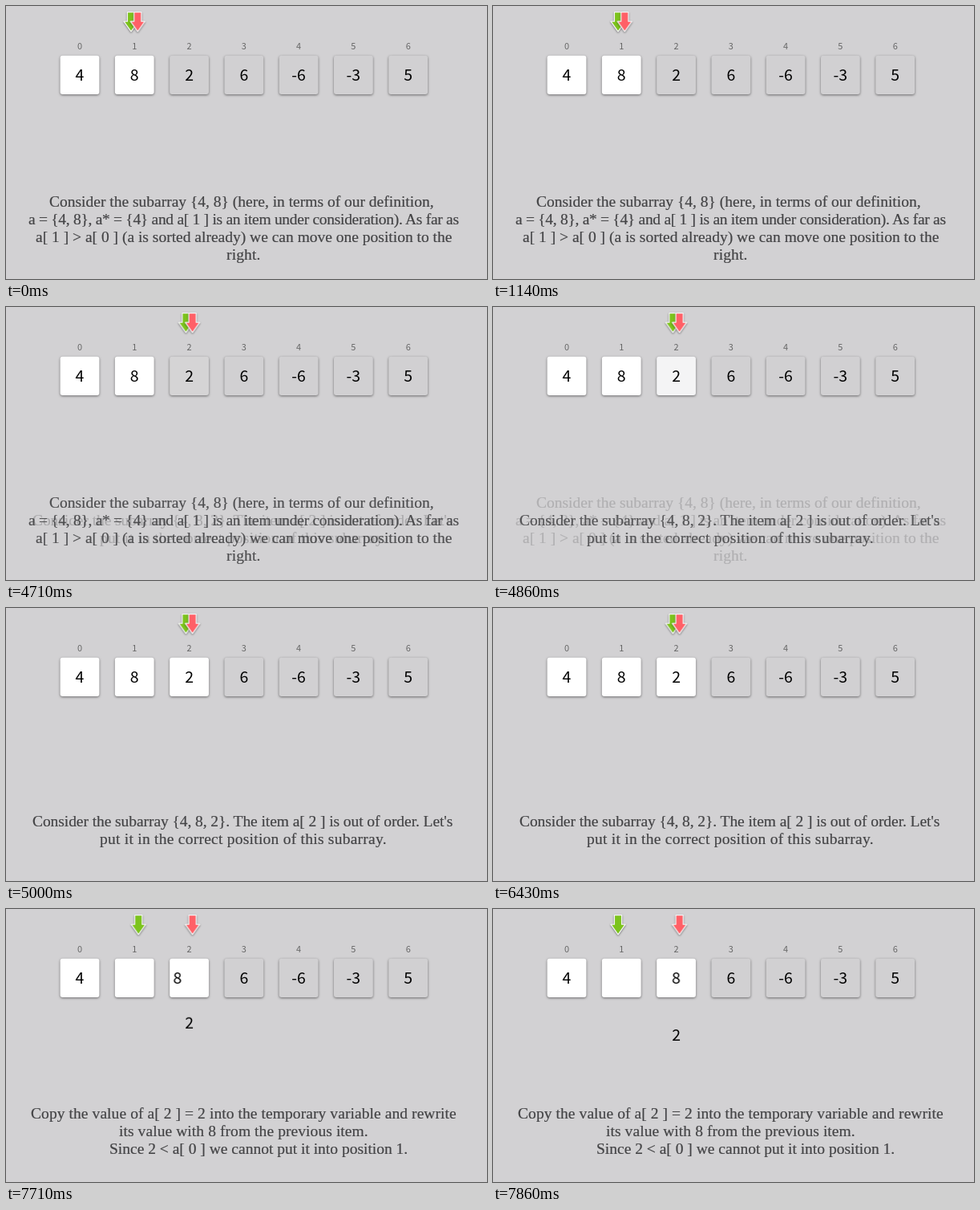
An HTML page that plays this animation: 600x340 px, repeating every 8 s.

```html
<!DOCTYPE html>
<html lang="en">
<head>
<meta charset="utf-8">
<title>Insertion sort</title>
<style>
  html, body { margin: 0; width: 100%; height: 100%; overflow: hidden; background: #d2d1d3; }
  svg { display: block; width: 600px; height: 340px; }

  .box { fill: #d1d0d2; filter: drop-shadow(0 1.5px 1.5px rgba(0, 0, 0, .5)); }
  .sorted { fill: #fff; }
  .num, .index { font-family: "Noto Sans CJK JP", "Noto Sans CJK SC", "Noto Sans CJK", "Noto Sans", sans-serif; text-anchor: middle; }
  .num { font-size: 19.5px; fill: #000; }
  .index { font-size: 11px; fill: #666; }
  .note { font: 19.5px "Liberation Serif", serif; fill: #434345; stroke: #434345; stroke-width: .2px; }
  .arrow { stroke: #f4f4f4; stroke-width: 1.3; stroke-linejoin: round; filter: drop-shadow(0 1.5px 1px rgba(0, 0, 0, .45)); }
  #green { fill: #7cc31c; }
  #red { fill: #ff6067; }

  .anim { animation: 8s cubic-bezier(.37, 0, .63, 1) infinite both; }
  #red { animation-name: red; }
  #green { animation-name: green; }
  #n1 { animation-name: shift; }
  #n2 { animation-name: lift; }
  #b2 { animation-name: whiten; animation-timing-function: cubic-bezier(.333, 0, .667, .333); }
  #note0 { animation-name: note0; }
  #note1 { animation-name: note1; }
  #note2 { animation-name: note2; }

  @keyframes red {
    0%, 53.5% { transform: translateX(164.3px); }
    56.875%, 100% { transform: translateX(232.6px); }
  }
  @keyframes green {
    0%, 54.75% { transform: translateX(156px); }
    58.25%, 92.875% { transform: translateX(224.4px); }
    97.5%, 100% { transform: translateX(156px); }
  }
  @keyframes shift {
    0%, 93.1875% { transform: none; }
    97.8125%, 100% { transform: translateX(68.3px); }
  }
  @keyframes lift {
    0%, 93.1875% { transform: none; }
    97.8125%, 100% { transform: translateY(71px); }
  }
  @keyframes whiten {
    0%, 58.025% { fill: #d1d0d2; }
    61.15%, 100% { fill: #fff; }
  }
  /* notes fade in linearly and fade out along 1 - p² */
  @keyframes note0 {
    0%, 58.025% { opacity: 1; animation-timing-function: cubic-bezier(.333, 0, .667, .333); }
    61.15%, 100% { opacity: 0; }
  }
  @keyframes note1 {
    0%, 58.025% { opacity: 0; animation-timing-function: linear; }
    61.15%, 93.1625% { opacity: 1; animation-timing-function: cubic-bezier(.333, 0, .667, .333); }
    96.3125%, 100% { opacity: 0; }
  }
  @keyframes note2 {
    0%, 93.1625% { opacity: 0; animation-timing-function: linear; }
    96.3125%, 100% { opacity: 1; }
  }
</style>
</head>
<body>
<svg id="stage" viewBox="0 0 600 340"></svg>
<script>
  const stage = document.getElementById('stage');

  function add(parent, tag, attrs, text) {
    const el = document.createElementNS('http://www.w3.org/2000/svg', tag);
    for (const key in attrs) el.setAttribute(key, attrs[key]);
    if (text !== undefined) el.textContent = text;
    return parent.appendChild(el);
  }

  const values = [4, 8, 2, 6, -6, -3, 5];
  const center = i => 92 + 68.28 * i;

  values.forEach((value, i) => {
    add(stage, 'text', { class: 'index', x: center(i), y: 54 }, i);
    add(stage, 'rect', {
      id: 'b' + i, class: 'box' + (i < 2 ? ' sorted' : i === 2 ? ' anim' : ''),
      x: center(i) - 24.4, y: 61.8, width: 48.8, height: 48.2, rx: 3
    });
  });
  values.forEach((value, i) => {
    const moves = i === 1 || i === 2;
    add(stage, 'text', { id: 'n' + i, class: 'num' + (moves ? ' anim' : ''), x: center(i), y: 92.7 }, value);
  });

  for (const id of ['green', 'red'])
    add(stage, 'path', { id, class: 'arrow anim', d: 'M-4.6 7.6H4.6V19.2H9L0 31.8L-9 19.2H-4.6Z' });

  // each line: left edge, tracking, text
  const notes = [
    [250, [
      [54, 0, 'Consider the subarray {4, 8} (here, in terms of our definition,'],
      [28, -.29, 'a = {4, 8}, a* = {4} and a[ 1 ] is an item under consideration). As far as'],
      [37, 0, 'a[ 1 ] > a[ 0 ] (a is sorted already) we can move one position to the'],
      [275, .15, 'right.']]],
    [272, [
      [33, -.07, "Consider the subarray {4, 8, 2}. The item a[ 2 ] is out of order. Let's"],
      [117, .25, 'put it in the correct position of this subarray.']]],
    [261, [
      [31, .08, 'Copy the value of a[ 2 ] = 2 into the temporary variable and rewrite'],
      [141, .08, 'its value with 8 from the previous item.'],
      [129, 0, 'Since 2 < a[ 0 ] we cannot put it into position 1.']]]
  ];
  notes.forEach(([top, lines], n) => {
    const group = add(stage, 'g', { id: 'note' + n, class: 'note anim' });
    lines.forEach(([x, track, text], i) =>
      add(group, 'text', { x, y: top + 22 * i, 'letter-spacing': track }, text));
  });
</script>
</body>
</html>
```
